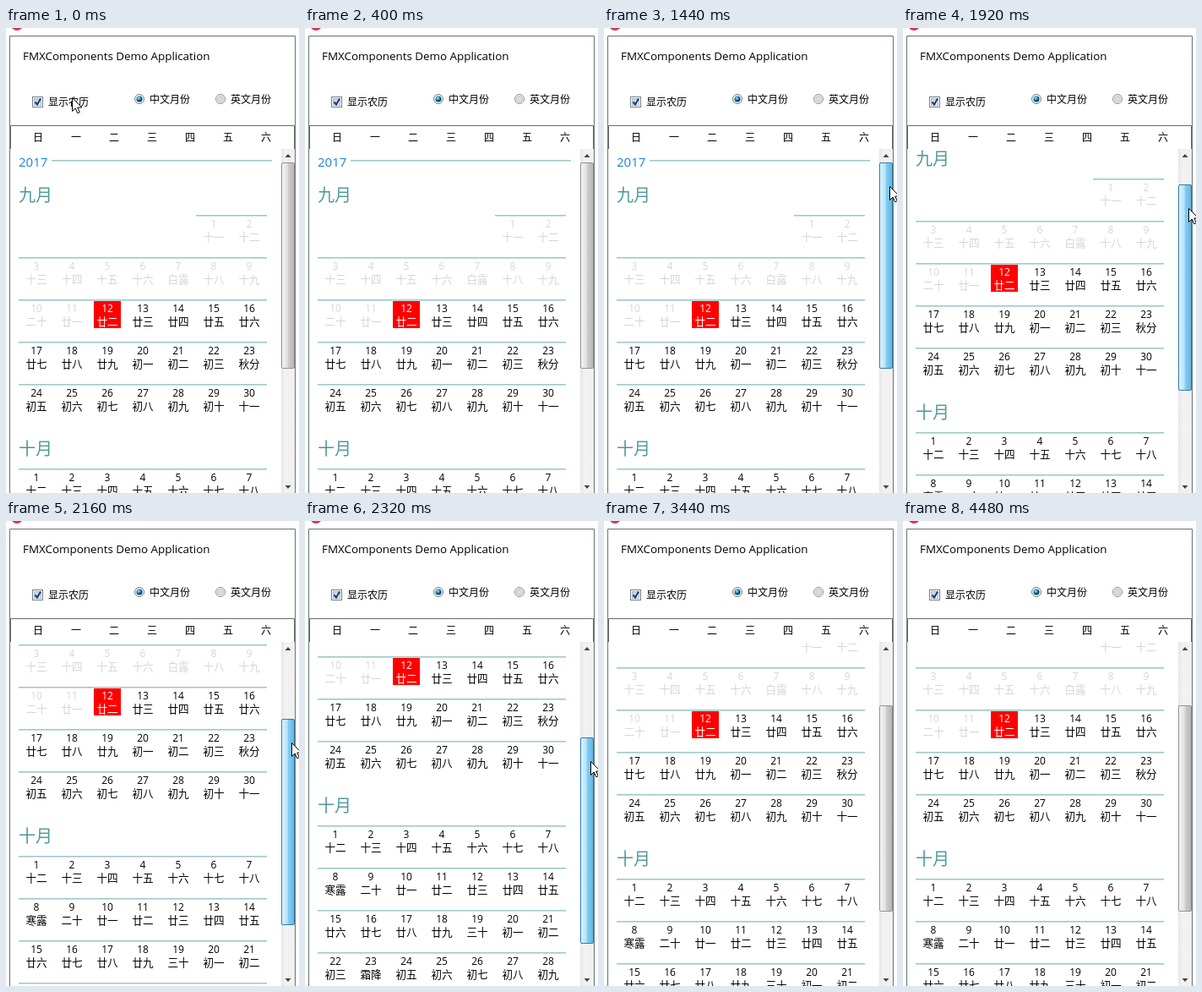
Animation of 347x550 px, one loop 5.36 s. Source, as an HTML page:

```html
<!DOCTYPE html>
<html lang="zh">
<head>
<meta charset="utf-8">
<style>
  html, body { margin: 0; width: 100%; height: 100%; overflow: hidden; background: #fff; }
  svg { display: block; width: 347px; height: 550px; }
  text { font-family: "Open Sans", "Noto Sans CJK SC", "Noto Sans CJK", sans-serif; font-size: 12px; fill: #000; }
  .mid { text-anchor: middle; }
  .lunar { font-size: 12.6px; }
  .past { fill: #d6d6d6; }
  .today { fill: #fff; }
  .month { font-size: 20px; fill: #4f9898; }
  .year { font-size: 15px; fill: #1684e0; }
  .rule { fill: #9ccaca; }
</style>
</head>
<body>
<svg viewBox="0 0 347 550">
  <defs>
    <linearGradient id="grey">
      <stop offset="0" stop-color="#f4f4f4"/><stop offset=".45" stop-color="#e2e2e2"/>
      <stop offset=".5" stop-color="#cfcfcf"/><stop offset="1" stop-color="#b4b4b4"/>
    </linearGradient>
    <linearGradient id="blue">
      <stop offset="0" stop-color="#dcf3fd"/><stop offset=".45" stop-color="#b4e3fa"/>
      <stop offset=".5" stop-color="#86cef3"/><stop offset="1" stop-color="#62b4e4"/>
    </linearGradient>
    <linearGradient id="track">
      <stop offset="0" stop-color="#e6e6e6"/><stop offset=".3" stop-color="#f2f2f2"/><stop offset="1" stop-color="#f0f0f0"/>
    </linearGradient>
    <linearGradient id="box" x2="1" y2="1">
      <stop offset="0" stop-color="#b8cfe0"/><stop offset="1" stop-color="#f4f8fb"/>
    </linearGradient>
    <radialGradient id="dot" cx=".4" cy=".35">
      <stop offset="0" stop-color="#b4f0ff"/><stop offset=".5" stop-color="#2a9cc4"/><stop offset="1" stop-color="#0c3f60"/>
    </radialGradient>
    <clipPath id="view"><rect x="6" y="143" width="320" height="407"/></clipPath>
  </defs>

  <circle cx="13" cy="-4" r="7" fill="#d8344c"/>
  <path d="M4.5 550V9.5H342.5V550" fill="#fff" stroke="#63756c"/>
  <path d="M5.5 143V115.5H341.5V143" fill="none" stroke="#6c6c6c"/>

  <text x="20" y="38" style="font-size:13.4px">FMXComponents Demo Application</text>

  <rect x="31.5" y="81.5" width="12" height="12" fill="#fff" stroke="#6f7f8c"/>
  <rect x="33.5" y="83.5" width="8" height="8" fill="url(#box)" stroke="#a9b9c6"/>
  <path d="M34.5 87.5l2.5 3 4-7" fill="none" stroke="#22386e" stroke-width="2"/>
  <text x="50" y="92">显示农历</text>

  <circle cx="158" cy="84" r="5.5" fill="#f2f6f8" stroke="#6f7f8c"/>
  <circle cx="158" cy="84" r="3.5" fill="url(#dot)"/>
  <text x="170" y="89">中文月份</text>
  <circle cx="254" cy="84" r="5.5" fill="#f4f4f4" stroke="#8e8f8f"/>
  <circle cx="254" cy="84" r="3.5" fill="#dadde0" stroke="#c0c4c8"/>
  <text x="266" y="89">英文月份</text>

  <g id="weekdays"></g>
  <g clip-path="url(#view)"><g id="calendar"></g></g>

  <rect x="326" y="143" width="16" height="407" fill="url(#track)"/>
  <path d="M330.5 153l3.5-4 3.5 4zM330.5 541h7l-3.5 4z" fill="#444"/>
  <g id="thumb">
    <rect x="326.5" y="159.5" width="15" height="243" rx="1.5" fill="url(#grey)" stroke="#929292"/>
    <rect id="glow" x="326.5" y="159.5" width="15" height="243" rx="1.5" fill="url(#blue)" stroke="#357ba8"/>
  </g>

  <path id="arrow" d="M.5.5V16.5L4.2 13 6.8 18.8 9.3 17.7 6.8 12H11.8z" fill="#fff" stroke="#000"/>
  <path id="resize" d="M.5 0L5.5-5V-2H12.5V-5L17.5 0 12.5 5V2H5.5V5z" fill="#fff" stroke="#000"/>
</svg>
<script>
const LOOP = 5360, TICK = 80, SCROLL_RATIO = 1.66, TODAY = 12;
const byId = id => document.getElementById(id);

function add(parent, tag, attrs, content = '') {
  const node = document.createElementNS('http://www.w3.org/2000/svg', tag);
  for (const key in attrs) node.setAttribute(key, attrs[key]);
  node.textContent = content;
  parent.append(node);
}

const calendar = byId('calendar');
const label = (x, y, cls, content) => add(calendar, 'text', { x, y, class: cls }, content);
const rule = (x, y, right) => add(calendar, 'rect', { x, y, width: right - x, height: 1.6, class: 'rule' });

const DIGITS = '十一二三四五六七八九十';
function lunarName(n) {
  if (n === 20) return '二十';
  if (n === 30) return '三十';
  return '初十廿'[n <= 10 ? 0 : Math.floor(n / 10)] + DIGITS[n <= 10 ? n : n % 10];
}

// The lunar month begins on the 20th in both months.
function drawMonth({ title, top, firstColumn, days, shift, terms, today = 0 }) {
  label(15, top + 34, 'month', title);
  for (let day = 1; day <= days; day++) {
    const cell = firstColumn + day - 1, column = cell % 7;
    const y = top + 50 + 50 * Math.floor(cell / 7);
    const x = 36 + 42 * column;
    if (day === 1 || column === 0) rule(x - 21, y, 309);
    if (day === today) add(calendar, 'rect', { x: x - 16, y: y + 2, width: 32, height: 32, fill: '#f00' });
    const state = day < today ? ' past' : day === today ? ' today' : '';
    const lunar = day < 20 ? day + shift : day - 19;
    // Eleven to nineteen are written with a plain ten.
    const name = terms[day] || (lunar > 10 && lunar < 20 ? '十' + DIGITS[lunar - 10] : lunarName(lunar));
    label(x, y + 15, 'mid' + state, day);
    label(x, y + 31, 'mid lunar' + state, name);
  }
}

[...'日一二三四五六'].forEach((name, i) =>
  add(byId('weekdays'), 'text', { x: 38 + 45 * i, y: 134, class: 'mid' }, name));

label(15, 164, 'year', '2017');
rule(54, 156, 315);
drawMonth({ title: '九月', top: 171, firstColumn: 5, days: 30, shift: 10, today: TODAY, terms: { 7: '白露', 23: '秋分' } });
drawMonth({ title: '十月', top: 471, firstColumn: 0, days: 31, shift: 11, terms: { 8: '寒露', 23: '霜降' } });

// Each step holds its values until the next: [start ms, ...values]
const thumbSteps = [[0, 0], [1760, 4], [1840, 13], [1920, 26], [2000, 42], [2080, 59], [2160, 75],
  [2240, 89], [2320, 97], [2800, 91], [2880, 76], [2960, 62], [3040, 59]];
const glowSteps = [[0, 0], [1120, .5], [1200, 1], [3360, .5], [3440, 0]];
const OFF = 400;
const pointerSteps = [[0, 78, 82], [160, 125, 95], [240, 215, 125], [320, 310, 160], [400, OFF, 0],
  [1040, 338, 189], [1120, 339, 186], [1200, 338, 186], [1440, 338], [2800, 337], [2880, 335],
  [2960, 333], [3280, 337, 248], [3360, 339, 250], [3440, OFF, 0]];
const resizeTimes = [1040, 3360];

const held = (steps, t) => steps.findLast(step => step[0] <= t);

function move(id, x, y) {
  byId(id).setAttribute('transform', `translate(${x} ${y})`);
}

function draw(now) {
  const t = Math.floor(now % LOOP / TICK) * TICK;
  const thumb = held(thumbSteps, t)[1];
  move('thumb', 0, thumb);
  move('calendar', 0, -Math.round(thumb * SCROLL_RATIO));
  byId('glow').setAttribute('opacity', held(glowSteps, t)[1]);

  // Without its own height the pointer holds on to the thumb.
  const [start, x, y = 187 + thumb] = held(pointerSteps, t);
  const resizing = resizeTimes.includes(start);
  move('arrow', resizing ? OFF : x, y);
  move('resize', resizing ? x : OFF, y);
}

const begin = performance.now();
function loop() {
  draw(performance.now() - begin);
  requestAnimationFrame(loop);
}
draw(0);
requestAnimationFrame(loop);
</script>
</body>
</html>
```
